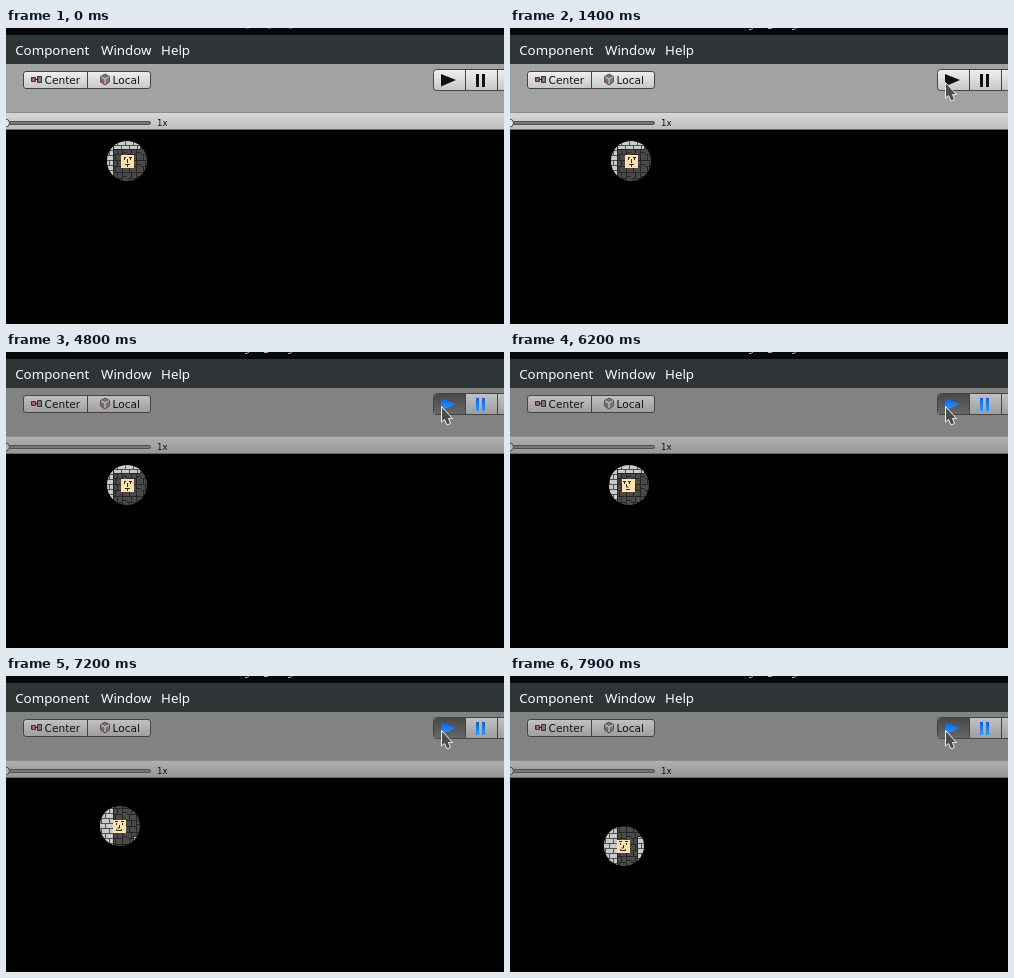
Animation of 498 by 296 pixels, one loop 8 s. Source, as an HTML page:

```html
<!DOCTYPE html>
<html lang="en">
<head>
<meta charset="utf-8">
<title>Editor play mode</title>
<style>
  html, body { margin: 0; width: 100%; height: 100%; overflow: hidden; background: #000; }
  svg { display: block; width: 498px; height: 296px; }
  .menu { font: 13.33px "Noto Sans", sans-serif; fill: #fcfcfc; }
  .label { font: 10.6px "DejaVu Sans", sans-serif; fill: #111; }
  .small { font-size: 8.6px; }
  .line { stroke: #444; fill: none; }
</style>
</head>
<body>
<svg viewBox="0 0 498 296">
  <defs>
    <linearGradient id="button" x2="0" y2="1">
      <stop stop-color="#f0f0f0"/><stop offset="1" stop-color="#c6c6c6"/>
    </linearGradient>
    <linearGradient id="buttonDim" x2="0" y2="1">
      <stop stop-color="#c2c2c2"/><stop offset="1" stop-color="#9d9d9d"/>
    </linearGradient>
    <linearGradient id="pressed" x2="0" y2="1">
      <stop stop-color="#484848"/><stop offset="1" stop-color="#686868"/>
    </linearGradient>
    <linearGradient id="bar" x2="0" y2="1">
      <stop stop-color="#d8d8d8"/><stop offset="1" stop-color="#bcbcbc"/>
    </linearGradient>
    <linearGradient id="barDim" x2="0" y2="1">
      <stop stop-color="#b0b0b0"/><stop offset="1" stop-color="#979797"/>
    </linearGradient>
    <linearGradient id="blue" x2="0" y2="1">
      <stop stop-color="#0a5fe0"/><stop offset="1" stop-color="#2e9bff"/>
    </linearGradient>
    <pattern id="wall" x="93" y="113" width="8" height="10" patternUnits="userSpaceOnUse">
      <path fill="#c9cbcb" d="M0 0h8v10H0z"/>
      <path stroke="#505252" d="M0 4.5h8M0 9.5h8M2.5 0v5M6.5 5v5"/>
    </pattern>
    <pattern id="floor" x="107" y="121" width="14" height="12" patternUnits="userSpaceOnUse">
      <path fill="#4b4a48" d="M0 0h14v12H0z"/>
      <path stroke="#282726" fill="none" d="M0 5.5h9M0 11.5h14M4.5 0v5M9.5 0v12M2.5 6v5M10 3.5h4"/>
    </pattern>
    <clipPath id="light"><circle id="spot" r="20"/></clipPath>
  </defs>

  <path fill="#050709" d="M0 0h498v7H0z"/>
  <path id="title" fill="none" stroke="#a9acae"/>
  <path fill="#2f3437" d="M0 7h498v29H0z"/>
  <g class="menu">
    <text x="9.2" y="27">Component</text>
    <text x="95" y="27">Window</text>
    <text x="155" y="27">Help</text>
  </g>

  <path id="toolbar" d="M0 36h498v48H0z"/>
  <path id="strip" d="M0 84h498v18H0z"/>
  <path stroke="#8c8c8c" d="M0 84.5h498"/>
  <path stroke="#6b6b6b" d="M0 101.5h498"/>
  <rect x="-5" y="93.5" width="149.5" height="3" rx="1.5" fill="#777" stroke="#505050"/>
  <circle id="thumb" cy="95" r="4" cx="-.5" stroke="#4a4a4a"/>
  <text class="label small" x="151" y="98">1x</text>

  <g class="line">
    <rect class="btn" x="17.5" y="43.5" width="127" height="17" rx="2.5"/>
    <path d="M81.5 44v16"/>
    <rect class="btn" x="427.5" y="41.5" width="90" height="21" rx="3"/>
    <path id="down" stroke="none" fill="url(#pressed)" d="M459 42v20h-28q-3 0-3-3v-14q0-3 3-3z"/>
    <path d="M459.5 42v20M491.5 42v20"/>
  </g>
  <path fill="#b85a5a" stroke="#333" d="M25.5 49.5h4v4h-4z"/>
  <path fill="#777" stroke="#333" d="M31.5 48.5h4v6h-4z"/>
  <path stroke="#222" d="M29 51.5h3"/>
  <path fill="#777" stroke="#444" stroke-width=".8" d="M94.5 48.5l4.5-2.5 4.5 2.5v5.5l-4.5 3-4.5-3z"/>
  <path fill="none" stroke="#ddd" stroke-width=".8" d="M95 49l4 2 4-2M99 51v5"/>
  <path fill="#c0413a" d="M95 52l3 1.5v3l-3-2z"/>
  <text class="label" x="38.5" y="56">Center</text>
  <text class="label" x="106.5" y="56">Local</text>
  <path class="icon" d="M435 46l15 6-15 6.5z"/>
  <path class="icon" d="M470 46h3v13h-3zM476 46h3v13h-3z"/>

  <path fill="#000" d="M0 102h498v194H0z"/>
  <g clip-path="url(#light)">
    <path fill="url(#floor)" d="M90 110h55v85H90z"/>
    <path fill="url(#wall)" d="M90 110h17v85H90zM107 110h27v11h-27zM127 160h18v35h-18z"/>
    <path stroke="#242424" d="M107 121.5h27M107.5 110v85M127.5 160v35M127 160.5h15"/>
    <g id="hero">
      <path fill="#fbe2ad" d="M-6 -6h13v13h-13z"/>
      <path id="face" fill="none" stroke="#33261a"/>
    </g>
  </g>

  <path id="cursor" fill="#4b4c4d" stroke="#eee" stroke-linejoin="round"
    d="M.5 .5v15.500l3-2.500 2.500 5.500 3.500-1.500-2-5h4z"/>
</svg>
<script>
  const LOOP = 8000;
  const $ = id => document.getElementById(id);
  const set = (el, name, value) => el.setAttribute(name, value);
  const all = (sel, name, value) => document.querySelectorAll(sel).forEach(el => set(el, name, value));

  // [start ms, x, y]
  const pointer = [[0, 520, 44], [1200, 485, 44], [1300, 453, 51], [1400, 435, 54]];
  const right = [0, 121, 133];
  // One value per 100 ms tick
  const walkLeft = [120, 119, 118, 116, 115, 114].map((x, i) => [6100 + i * 100, x, 133]);
  const walkDown = [134, 137, 143, 150, 156, 162, 164, 165, 166, 168, 170]
    .map((y, i) => [6900 + i * 100, 114, y]);
  const walk = [right, ...walkLeft, ...walkDown];

  const at = (steps, t) => steps.filter(s => s[0] <= t).pop();

  const faces = {
    idle: 'M-3 -3.500h2M2 -3.500h3M-2.500 -3v2M3.500 -3v2M.5 -2v4M-2 3.500h5M.5 4v2',
    left: 'M-5 -3.500h3M0 -3.500h3M-3.500 -3v2M1.500 -3v2M-1.500 -1v3h2M-2 4.500h4',
    down: 'M-4 -4.500h3M2 -4.500h3M-2.500 -3v2M3.500 -3v2M.5 -1v3h-2M-2.500 3v1.500h5v-1.500'
  };

  function draw(t) {
    const playing = t >= 2000;
    set($('title'), 'd', t < 800
      ? 'M240 .5h3M262 .5h3M283 .5h3'
      : 'M239 1.500h2l2-1.500M258 .5h4M282 1.500h2l2-1.500');
    set($('title'), 'opacity', t < 800 ? .4 : 1);
    set($('toolbar'), 'fill', playing ? '#828282' : '#a2a2a2');
    set($('strip'), 'fill', `url(#bar${playing ? 'Dim' : ''})`);
    set($('thumb'), 'fill', playing ? '#b5b5b5' : '#e4e4e4');
    all('.btn', 'fill', `url(#button${playing ? 'Dim' : ''})`);
    set($('down'), 'opacity', playing ? 1 : 0);
    all('.icon', 'fill', t >= 4800 ? 'url(#blue)' : '#111');

    const [, px, py] = at(pointer, t);
    set($('cursor'), 'transform', `translate(${px} ${py})`);

    const [, x, y] = at(walk, t);
    set($('spot'), 'cx', x);
    set($('spot'), 'cy', y);
    set($('hero'), 'transform', `translate(${t < 6100 ? x : x - 1} ${y})`);
    set($('face'), 'd', t < 6100 ? faces.idle : t < 7100 ? faces.left : faces.down);
  }

  const start = performance.now();
  function tick() {
    draw((performance.now() - start) % LOOP);
    requestAnimationFrame(tick);
  }
  tick();
</script>
</body>
</html>
```
